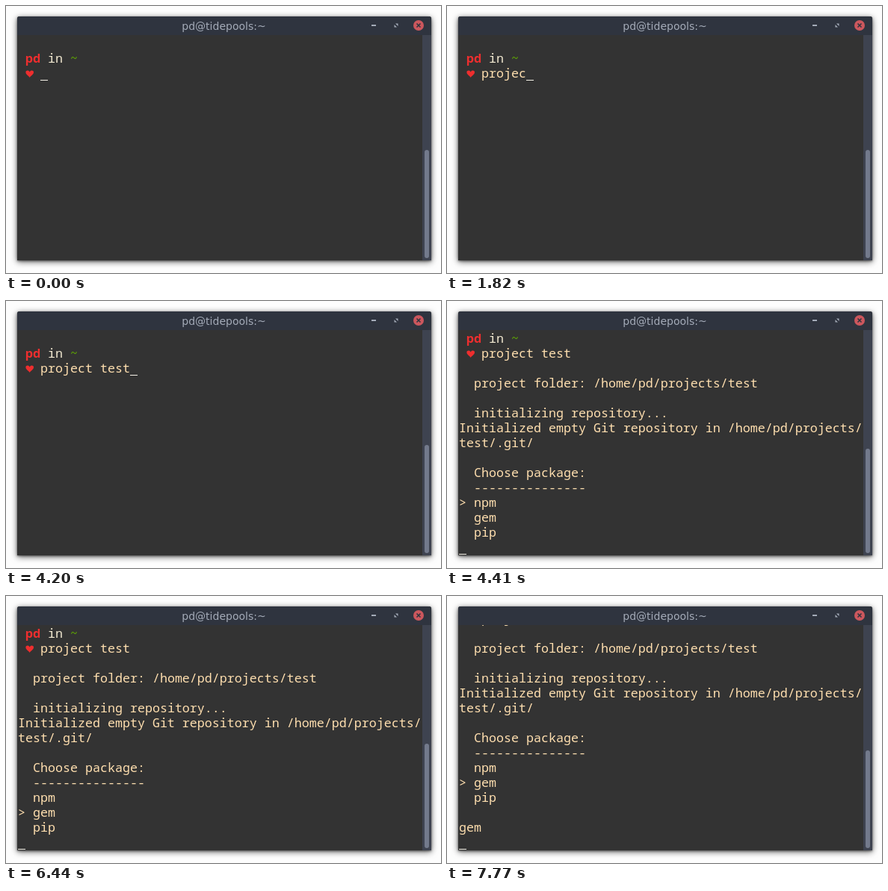
These frames come from a looping animation (582x358 px, 8000 ms). An HTML page:

```html
<!DOCTYPE html>
<html lang="en">
<head>
<meta charset="utf-8">
<title>Terminal</title>
<style>
  html, body { margin: 0; width: 100%; height: 100%; overflow: hidden; background: #fdfdfd; }
  #win {
    position: absolute; left: 15px; top: 14px; width: 554px; height: 327px;
    border-radius: 3px 3px 0 0; background: #333;
    box-shadow: 0 2px 9px rgba(0, 0, 0, .6), 0 1px 3px rgba(0, 0, 0, .5);
  }
  svg { position: absolute; left: 0; top: 0; display: block; }
  .term { font: 16.667px "Noto Sans Mono", monospace; fill: #ffdfaf; white-space: pre; }
  .title { font: 14px "DejaVu Sans", sans-serif; fill: #a4abb8; text-anchor: middle; }
</style>
</head>
<body>
<div id="win"></div>
<svg width="582" height="358" viewBox="0 0 582 358">
  <clipPath id="view"><rect x="15" y="39" width="542" height="302"/></clipPath>
  <path d="M15 39V17q0-3 3-3H566q3 0 3 3V39z" fill="#2f343f"/>
  <text class="title" x="291.5" y="32">pd@tidepools:~</text>
  <path d="M489 26h6" stroke="#a4abb8" stroke-width="2"/>
  <path d="M521 23.5h3.5v3.5zM519.5 25v3.5h3.5z" fill="#a4abb8"/>
  <circle cx="552" cy="26" r="7" fill="#cc575d"/>
  <path d="M549.5 23.5l5 5m0-5l-5 5" stroke="#2f343f" stroke-width="1.6"/>
  <rect x="557" y="39" width="12" height="302" fill="#3e4350"/>
  <rect id="thumb" x="560" width="6" rx="3" fill="#737a8c"/>
  <g clip-path="url(#view)">
    <g id="page" class="term">
      <text x="26" y="76" fill="#ee2e2e" font-weight="700">pd</text>
      <text x="56" y="76" fill="#f3ead2">in</text>
      <text x="86" y="76" fill="#5fa900">~</text>
      <path fill="#ee2e2e" d="M31.7 96C30.4 93.6 26.4 92 26.4 88.8C26.4 86.2 30.3 85.6 31.7 88.5C33.1 85.6 37 86.2 37 88.8C37 92 33 93.6 31.7 96z"/>
      <text id="cmd" x="46" y="96"></text>
      <g id="out"></g>
      <text id="mark" x="16">&gt;</text>
      <text id="pick" x="16" y="376">gem</text>
    </g>
    <rect id="cursor" width="10" height="1" fill="#f6f2e8"/>
  </g>
</svg>
<script>
const LOOP = 8000, CELL = 10, ROW = 20;
const RUN = 4410, DONE = 7770;
const command = "project test";
const keys = [1050, 1190, 1400, 1610, 1750, 1820, 2100, 2240, 2520, 2660, 2870, 3010];
const blinks = [[420, 1050], [3570, 4200], [5040, 5250], [5880, 5950]];
const moves = [[RUN, 0], [5320, 1], [5950, 2], [6440, 1], [6720, 0], [7070, 1]];
const output = [
  "",
  "  project folder: /home/pd/projects/test",
  "",
  "  initializing repository...",
  "Initialized empty Git repository in /home/pd/projects/",
  "test/.git/",
  "",
  "  Choose package:",
  "  " + "-".repeat(15),
  "  npm",
  "  gem",
  "  pip"
];

const $ = id => document.getElementById(id);
const baseline = row => 56 + row * ROW;
const show = (el, on) => el.setAttribute("visibility", on ? "visible" : "hidden");
const set = (el, attrs) => {
  for (const name in attrs) el.setAttribute(name, attrs[name]);
};

output.forEach((line, i) => {
  if (!line) return;
  const el = document.createElementNS("http://www.w3.org/2000/svg", "text");
  const indent = line.search(/\S/);
  set(el, { x: 16 + indent * CELL, y: baseline(3 + i) });
  el.textContent = line.trim();
  $("out").append(el);
});

function render(t) {
  const running = t >= RUN, done = t >= DONE;
  const typed = keys.filter(k => k <= t).length;
  const scroll = done ? 60 : running ? 20 : 0;
  const top = done ? 207 : running ? 198 : 193;

  $("cmd").textContent = command.slice(0, typed);
  set($("page"), { transform: `translate(0 ${-scroll})` });
  set($("thumb"), { y: top, height: 338 - top });
  show($("out"), running);
  show($("mark"), running);
  show($("pick"), done);

  const move = moves.filter(m => m[0] <= t).pop();
  if (move) set($("mark"), { y: baseline(12 + move[1]) });

  set($("cursor"), {
    x: running ? 16 : 46 + typed * CELL,
    y: running ? 339 : 99
  });
  show($("cursor"), !blinks.some(([off, on]) => t >= off && t < on));
}

const start = performance.now();
function tick() {
  render((performance.now() - start) % LOOP);
  requestAnimationFrame(tick);
}
tick();
</script>
</body>
</html>
```
